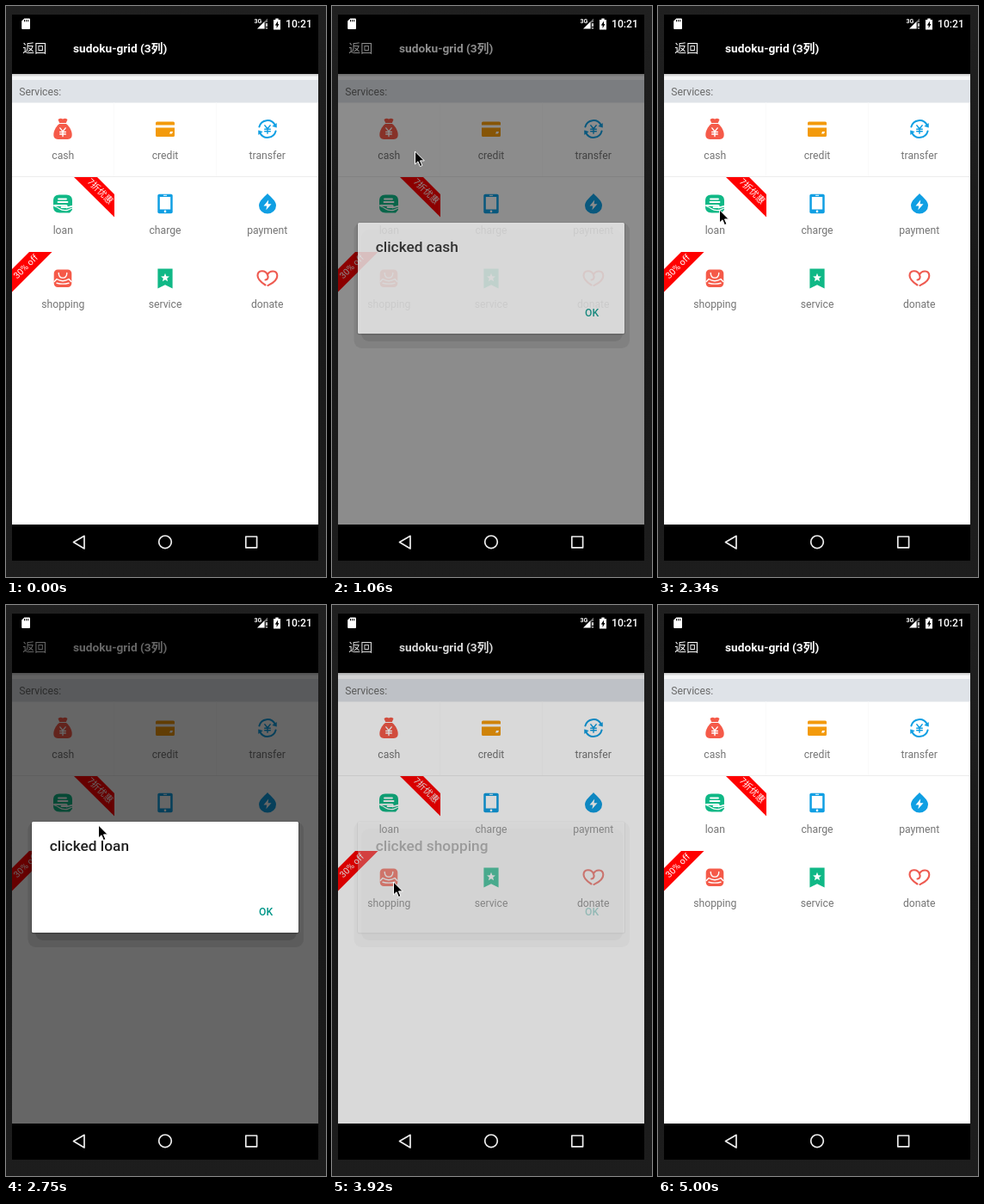
These frames come from a looping animation (372x664 px, 5450 ms). An HTML page:

```html
<!DOCTYPE html>
<html lang="en">
<head>
<meta charset="utf-8">
<title>sudoku-grid</title>
<style>
  html, body { margin: 0; width: 100%; height: 100%; overflow: hidden; background: #1b1b1b; }
  svg { display: block; width: 372px; height: 664px; font-family: Roboto, "Noto Sans CJK SC", "Noto Sans CJK", sans-serif; }
  .label { font-size: 12.2px; fill: #757575; text-anchor: middle; }
  .ribbon { font-size: 10.4px; fill: #fff; text-anchor: middle; }
  .line { fill: none; stroke-linecap: round; stroke-linejoin: round; }
</style>
</head>
<body>
<svg viewBox="0 0 372 664">
  <defs>
    <linearGradient id="wall" x2="0" y2="1">
      <stop offset="0" stop-color="#202020"/>
      <stop offset=".5" stop-color="#181818"/>
      <stop offset="1" stop-color="#1d1d1d"/>
    </linearGradient>
    <linearGradient id="edge" x2="0" y2="1">
      <stop offset="0" stop-color="#c4c4c4"/>
      <stop offset=".5" stop-color="#f5f6f7"/>
    </linearGradient>
    <path id="yen" class="line" d="M-3.2-4.6L0-.6 3.2-4.6M0-.6V5M-3.3 0H3.3M-3.3 2.5H3.3" stroke-width="1.4"/>
  </defs>
  <rect width="372" height="664" fill="url(#wall)"/>
  <rect x="7" y="10" width="356" height="635"/>

  <!-- status bar -->
  <g fill="#fff">
    <path d="M21.3 14.5H27q1 0 1 1V26q0 1-1 1H19.200q-1 0-1-1V17.600Z"/>
    <path d="M21.500 16v2.300M23.600 16v2.300M25.700 16v2.300" stroke="#000" stroke-width="1"/>
    <text x="288.500" y="19.500" font-size="7" font-weight="700">3G</text>
    <path d="M292 26.500L300.500 18V26.500Z"/>
    <path d="M300.500 18L304 14.500V19H301.500V26.500H300.500Z" opacity=".45"/>
    <path d="M302.300 20h1.500v4h-1.500zM302.300 25h1.500v1.500h-1.500z"/>
    <path d="M313.300 14.500h3.400v1.400h2.300v11.600h-8v-11.600h2.300Z"/>
    <path d="M316 17.500L312.800 22.500H314.600V26L317.400 21H316Z" fill="#000"/>
    <text x="325" y="25.300" font-size="12.200" font-weight="500">10:21</text>
    <text x="19.300" y="54" font-size="13.900">返回</text>
    <text x="78" y="53.500" font-size="13.700" font-weight="700">sudoku-grid (3列)</text>
  </g>

  <!-- page -->
  <rect x="7" y="79" width="356" height="524" fill="#fff"/>
  <rect x="7" y="79" width="356" height="7" fill="url(#edge)"/>
  <rect x="7" y="86" width="356" height="26.500" fill="#dfe3e8"/>
  <text x="15.300" y="104" font-size="12.200" fill="#6a6a6a">Services:</text>
  <path d="M7 198.500H363" stroke="#ececec"/>
  <path d="M125.500 112.500V198M244.500 112.500V198" stroke="#fafafa"/>

  <g transform="translate(66 143)" fill="#f55a49">
    <path d="M-5.500-11Q-2.500-13 0-11.600 3-13 5.500-11L3.800-7H-3.800Z"/>
    <path d="M-4-6H4C8-3 10.800 2.500 10.700 7 10.600 10.800 8 12 4.500 12H-4.500C-8 12-10.600 10.800-10.700 7-10.800 2.500-8-3-4-6Z"/>
    <use href="#yen" y="3.500" stroke="#fff"/>
  </g>
  <g transform="translate(185 143)" fill="#f39a0b">
    <path d="M-11-4.500V-7q0-1.500 1.500-1.500H9.500q1.500 0 1.500 1.500v2.500ZM-11-1.500H11V7.500q0 1.500-1.500 1.500H-9.500Q-11 9-11 7.500Z"/>
    <path d="M5 5.500L6 3H9L8 5.500Z" fill="#fff"/>
  </g>
  <g transform="translate(304 143)" fill="#109fe3" stroke="#109fe3">
    <path class="line" d="M-9.600-2.500A9.900 9.900 0 0 1 8.700-4.700M9.600 2.500A9.900 9.900 0 0 1-8.700 4.700" stroke-width="2"/>
    <path d="M10.500-6.500V-1.800L5.800-3.300ZM-10.500 6.500V1.800L-5.800 3.300Z" stroke-width=".5"/>
    <use href="#yen" y=".3"/>
  </g>
  <g transform="translate(66 230)">
    <path d="M-4-10.500H4C9-10.500 11-7.500 11-3.500V7L8 10.500H-3.500C-9 10.500-11 7.500-11 3.500V-3.500C-11-7.500-9-10.500-4-10.500Z" fill="#10b886"/>
    <path class="line" d="M-5-5.500H4M-5.500-2H5.500M-10 1.800H3Q6 1.800 4 4H-1.500M4.500 4.500L10.500 2.800" stroke="#fff" stroke-width="1.800"/>
    <path d="M-10.500 2.500Q-6 4-3.500 6T5 7.500L11 5" fill="none" stroke="#fff" stroke-width="1.300"/>
  </g>
  <g transform="translate(185 230)">
    <rect x="-8.700" y="-11.300" width="17.400" height="22.600" rx="1.800" fill="#109fe3"/>
    <rect x="-6.200" y="-8" width="12.400" height="14.500" fill="#fff"/>
    <path d="M-2-9.700H2" stroke="#fff"/>
    <circle cy="8.900" r="1.300" fill="#fff"/>
  </g>
  <g transform="translate(304 230)">
    <path d="M0-12C4-7.500 10-3.500 10 2A10 9.500 0 0 1-10 2C-10-3.500-4-7.500 0-12Z" fill="#109fe3"/>
    <path d="M1.200-4.500L-4.500 2.500H-.8L-1.600 7.300 4.500 .2H.6Z" fill="#fff"/>
  </g>
  <g transform="translate(66 317)">
    <rect x="-10.300" y="-10.500" width="20.600" height="20.500" rx="4.500" fill="#f55a49"/>
    <path class="line" d="M-4.800-6.500C-4.500 1 4.500 1 4.800-6.500M-9.800 3.500L-7 .5Q0 5 7 .5L9.800 3.500M-7 5.200Q0 7 7 5.200" stroke="#fff" stroke-width="1.400"/>
  </g>
  <g transform="translate(185 317)">
    <path d="M-8.600-11.500H8.600V11.500L0 7.300-8.600 11.500Z" fill="#10b886"/>
    <path id="star" fill="#fff"/>
  </g>
  <path class="line" transform="translate(304 317)" d="M-2.500 7.500C-8 4-11.500 1-11.500-3.500C-11.500-10-2.500-10.500 0-4.500C2.500-10 11.300-10 11.300-3.300C11.300 3 4.500 6 .5 8M0-4.500C1.500-1 0 1.500-2.500 1.500" stroke="#ee5a50" stroke-width="2.100"/>

  <path d="M79 199H106L126 219V245.500Z" fill="#f00"/>
  <text class="ribbon" transform="translate(109.500 215.500) rotate(45)" y="3.500">7折优惠</text>
  <path d="M7 332.500V306L27 286H53.500Z" fill="#f00"/>
  <text class="ribbon" transform="translate(23 303) rotate(-45)" y="3.500">30% off</text>
  <g id="labels"></g>

  <!-- dialog -->
  <rect id="dim" x="7" y="31" width="356" height="572" opacity="0"/>
  <g id="shadow" opacity="0">
    <rect id="halo" fill-opacity=".1"/>
    <rect x="34" y="260" width="304" height="130" rx="9" fill-opacity=".12"/>
    <rect x="29" y="251.500" width="312" height="131" rx="3" fill-opacity=".2"/>
  </g>
  <g id="dialog" opacity="0">
    <rect x="30" y="252" width="310" height="129" rx="1.500" fill="#fff"/>
    <text id="message" x="50.700" y="285.800" font-size="17.300" font-weight="500" fill="#212121"></text>
    <text x="294" y="361.300" font-size="12.200" font-weight="500" fill="#009688">OK</text>
  </g>

  <!-- navigation bar -->
  <g class="line" stroke="#eee" stroke-width="1.700">
    <path d="M91 616.300V631L78.500 623.600Z"/>
    <circle cx="185" cy="623.300" r="7.300"/>
    <rect x="278.800" y="617" width="12.800" height="12.800"/>
  </g>

  <path id="cursor" d="M0 0V15L3.500 11.800 5.900 17.600 8.400 16.500 6 10.900H10.800Z" stroke="#fff" stroke-width="1" visibility="hidden"/>
</svg>
<script>
const LOOP = 5450, START = 240, TICK = 58.05;
const $ = id => document.getElementById(id);
const clamp = v => Math.max(0, Math.min(1, v));

const names = ["cash", "credit", "transfer", "loan", "charge", "payment", "shopping", "service", "donate"];
$("labels").innerHTML = names.map((name, i) =>
  `<text class="label" x="${66.3 + (i % 3) * 118.7}" y="${177.8 + Math.floor(i / 3) * 86.7}">${name}</text>`).join("");

$("star").setAttribute("d", "M" + Array.from({ length: 10 }, (_, i) => {
  const r = i % 2 ? 2.3 : 5.2, a = i * Math.PI / 5;
  return `${(r * Math.sin(a)).toFixed(2)} ${(-1 - r * Math.cos(a)).toFixed(2)}`;
}).join("L") + "Z");

const dialogs = [
  { name: "cash", open: 12, close: 29 },
  { name: "loan", open: 40, close: 54 },
  { name: "shopping", open: 63, close: 79 }
];
const path = [
  [0, 152, 572], [2, 126, 425], [4, 78, 245], [5, 68, 192], [6, 82, 174], [7, 96, 168],
  [14, 96, 168], [17, 145, 236], [20, 232, 342], [21, 245, 351], [23, 280, 363], [25, 297, 367],
  [29, 297, 367], [31, 235, 330], [34, 92, 246], [36, 71, 236],
  [42, 71, 236], [45, 180, 292], [48, 300, 341], [49, 310, 345],
  [54, 310, 345], [55, 270, 341], [57, 118, 326], [59, 71, 321],
  [64, 71, 321], [65, 120, 342], [67, 281, 400], [70, 296, 378], [72, 300, 363], [75, 299, 354],
  [79, 299, 354], [80, 290, 440], [81, 268, 614], [82, 268, 614]
];

function cursorAt(n) {
  const i = path.findIndex(p => p[0] > n);
  if (n < 0 || i < 1) return null;
  const [a, b] = [path[i - 1], path[i]];
  const k = (n - a[0]) / (b[0] - a[0]);
  return [a[1] + (b[1] - a[1]) * k, a[2] + (b[2] - a[2]) * k];
}

function setOpacity(id, v) { $(id).setAttribute("opacity", v.toFixed(3)); }

function drawDialog(n) {
  const d = dialogs.find(d => n >= d.open && n < d.close + 4);
  let dim = 0, panel = 0, grow = 0;
  if (d && n < d.close) {
    dim = panel = clamp((n - d.open + 1) / 4);
  } else if (d) {
    const k = n - d.close + 1;
    dim = 1 - (k / 4) ** 1.3;
    panel = clamp(1 - k * .55);
    grow = 7;
  }
  if (d) $("message").textContent = "clicked " + d.name;
  setOpacity("dim", dim * .6);
  setOpacity("shadow", panel);
  setOpacity("dialog", panel);
  const box = { x: 25.5 - grow, y: 252 - grow * .8, width: 320.5 + grow * 2, height: 146 + grow * 1.7, rx: 9 + grow * .4 };
  for (const key in box) $("halo").setAttribute(key, box[key]);
}

function render(t) {
  const n = Math.floor((t - START) / TICK);
  drawDialog(n);
  const p = cursorAt(n), cursor = $("cursor");
  cursor.setAttribute("visibility", p ? "visible" : "hidden");
  if (p) cursor.setAttribute("transform", `translate(${Math.round(p[0]) + .5} ${Math.round(p[1]) + 1})`);
}

const began = performance.now();
function loop() {
  render((performance.now() - began) % LOOP);
  requestAnimationFrame(loop);
}
loop();
</script>
</body>
</html>
```
